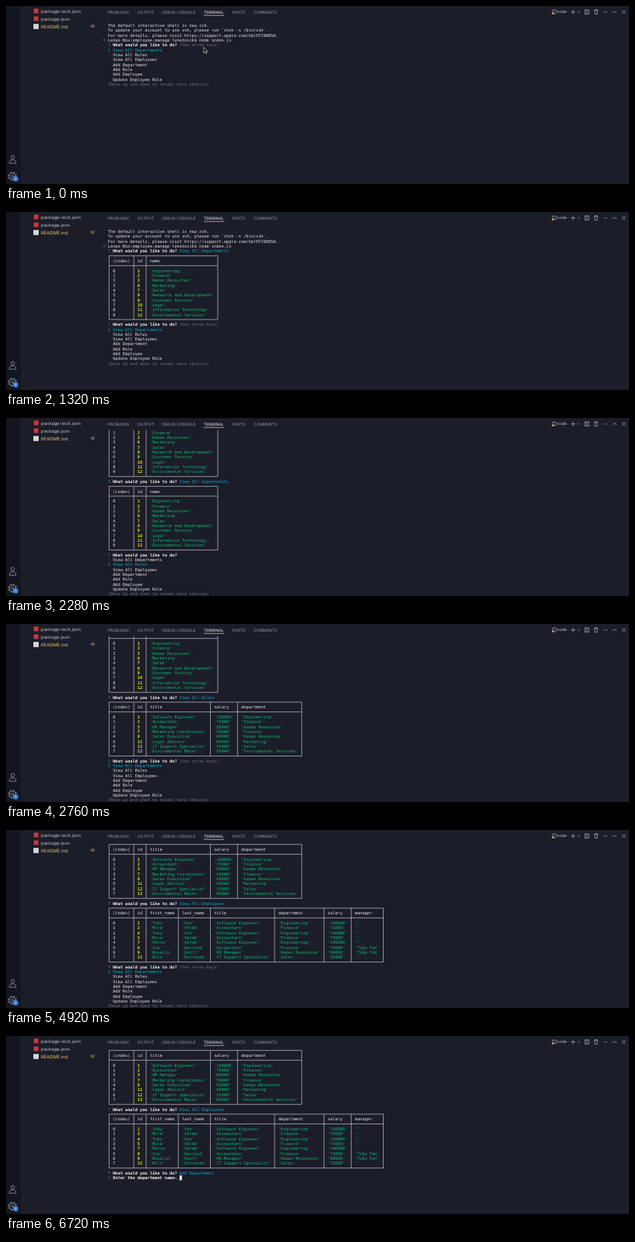
An HTML page for the animation above (8 s loop, 800 by 230 pixels).

```html
<!DOCTYPE html>
<html lang="en">
<head>
<meta charset="utf-8">
<title>Terminal session</title>
<style>
  html, body { margin: 0; width: 100%; height: 100%; overflow: hidden; background: #1b1d29; }
  svg { display: block; width: 800px; height: 230px; }
  text { white-space: pre; text-rendering: geometricPrecision; }
  .ui { font-family: Inter, "Open Sans", sans-serif; }
  .tabs { font-size: 5.05px; fill: #9a9ca6; }
  .files { font-size: 5.85px; fill: #c3c5cd; }
  .icons { fill: none; stroke: #c0c2ca; stroke-width: .65; }
  #term { font: 5.27px "DejaVu Sans Mono", "Liberation Mono", monospace; }
  .white { fill: #e6e6e8; }
  .bold { fill: #f2f2f2; font-weight: bold; }
  .dim { fill: #6c6e76; }
  .green { fill: #0dbc79; }
  .cyan { fill: #11a8cd; }
  .yellow { fill: #e5e510; font-weight: bold; }
  .box { fill: none; stroke: #c4c5ca; stroke-width: .7; }
</style>
</head>
<body>
<svg viewBox="0 0 800 230">
  <defs><clipPath id="pane"><rect x="120" y="15.6" width="677" height="215"/></clipPath></defs>
  <rect width="800" height="230" fill="#1b1d29"/>
  <rect width="19" height="230" fill="#14161f"/>

  <g class="ui files">
    <rect x="35.7" y="3.4" width="6" height="6" fill="#cb3837"/>
    <rect x="35.7" y="13.4" width="6" height="6" fill="#cb3837"/>
    <rect x="35.2" y="23.2" width="6.8" height="6.6" fill="#d9d6d6"/>
    <text x="45" y="8.6">package-lock.json</text>
    <text x="45" y="18.6">package.json</text>
    <g fill="#e3c06f">
      <text x="45" y="28.6">README.md</text>
      <text x="109" y="28.4" font-size="5.3">M</text>
    </g>
  </g>

  <g fill="none" stroke="#868995" stroke-width=".9">
    <circle cx="8.6" cy="195.4" r="2.3"/>
    <path d="M4.4 203.2v-1.2q0-3.2 4.2-3.2t4.2 3.2v1.2z"/>
    <circle cx="8.4" cy="220" r="4.1"/>
    <circle cx="8.4" cy="220" r="5" stroke-dasharray="1.96" stroke-width="1.3"/>
    <circle cx="8.4" cy="220" r="1.5"/>
  </g>
  <circle cx="12.3" cy="223.3" r="3.5" fill="#3c7fd0"/>
  <text class="ui" x="12.3" y="224.9" font-size="4.4" fill="#fff" text-anchor="middle">1</text>

  <g class="ui tabs">
    <text x="130.6" y="9.5">PROBLEMS</text>
    <text x="168.8" y="9.5">OUTPUT</text>
    <text x="200.3" y="9.5">DEBUG CONSOLE</text>
    <text x="254" y="9.5" fill="#f0f0f2">TERMINAL</text>
    <text x="290.4" y="9.5">PORTS</text>
    <text x="318" y="9.5">COMMENTS</text>
    <text x="707.6" y="9.4" fill="#c6c8d0" font-size="5.2">node</text>
  </g>
  <rect x="254" y="11.8" width="26" height=".7" fill="#d8d9de"/>

  <g class="icons">
    <path d="M702 5.2h4v4.6h-4z"/>
    <path d="M728.2 4.7v6M725.2 7.7h6M733.9 7l1.4 1.4 1.4-1.4"/>
    <path d="M743.3 5h5.2v5.4h-5.2zM745.9 5v5.4"/>
    <path d="M755.3 5.7h5M756 5.7l.3 4.9h3l.3-4.9M757 5.5v-.9h1.6v.9"/>
    <path d="M767 7.8h.9M769 7.8h.9M771 7.8h.9" stroke-width=".9"/>
    <path d="M778.8 9l2.6-2.6L784 9M791.2 5.4l4.4 4.4M795.6 5.4l-4.4 4.4"/>
  </g>
  <circle cx="702.2" cy="9.6" r="1.3" fill="#d9a94a"/>
  <rect x="797.2" y="15.6" width=".5" height="215" fill="#292c39"/>

  <g id="term" clip-path="url(#pane)"></g>
  <path id="pointer" d="M253.9 53.4v7l1.6-1.4 1.1 2.5 1.2-.5-1.1-2.4 2.2-.1z"
        fill="#000" stroke="#fff" stroke-width=".6"/>
</svg>
<script>
const LOOP = 8000, LEFT = 130.8, TOP = 25, CHAR = 3.172, ROW = 6.33, ROWS = 33;
const term = document.getElementById('term');
const pointer = document.getElementById('pointer');

const choices = ['View All Departments', 'View All Roles', 'View All Employees',
  'Add Department', 'Add Role', 'Add Employee', 'Update Employee Role'];

const intro = ['The default interactive shell is now zsh.',
  'To update your account to use zsh, please run `chsh -s /bin/zsh`.',
  'For more details, please visit https://support.apple.com/kb/HT208050.',
  'Lenas-Box:employee.manage lenatovik$ node index.js'];

const parse = (head, body) => ({
  head: ['(index)', ...head.split('|')],
  rows: body.trim().split('\n').map((line, i) => {
    const [id, ...cells] = line.trim().split('|');
    return [String(i), id, ...cells.map(c => `'${c}'`)];
  })
});

const departments = parse('id|name', `
  1|Engineering
  2|Finance
  3|Human Resources
  6|Marketing
  7|Sales
  8|Research and Development
  9|Customer Service
  10|Legal
  11|Information Technology
  12|Enviromental Services`);

const roles = parse('id|title|salary|department', `
  1|Software Engineer|100000|Engineering
  2|Accountant|75000|Finance
  3|HR Manager|80000|Human Resources
  7|Marketing Coordinator|50000|Finance
  8|Sales Executive|60000|Human Resources
  11|Legal Advisor|80000|Marketing
  12|IT Support Specialist|55000|Sales
  13|Enviromental Maint.|80000|Enviromental Services`);

const employees = parse('id|first_name|last_name|title|department|salary|manager', `
  1|Toby|Fen|Software Engineer|Engineering|100000| 
  2|Mira|Velde|Accountant|Finance|75000| 
  4|Toby|Fen|Software Engineer|Engineering|100000| 
  5|Mira|Velde|Accountant|Finance|75000| 
  7|Petra|Velde|Software Engineer|Engineering|100000| 
  8|Ivo|Harlund|Accountant|Finance|75000|Toby Fen
  9|Rosalin|Quill|HR Manager|Human Resources|80000|Toby Fen
  12|Nils|Ostravek|IT Support Specialist|Sales|55000| `.replace(/\| *(?=\n|$)/g, '| ')
  .concat('\n').replace(/\| \n$/, '|\u00a0'));

// Answered questions: chosen item and the table it prints
const answers = [[0, departments], [0, departments], [1, roles], [2, employees]];

// [start ms, answers on screen, selected choice | 'busy' | 'form']
const timeline = [
  [0, 0, 0], [600, 1, 'busy'], [660, 1, 0], [1620, 2, 'busy'], [1680, 2, 0],
  [2280, 2, 1], [2760, 3, 0], [3900, 3, 1], [4140, 3, 2], [4500, 4, 0],
  [5460, 4, 1], [5760, 4, 2], [6000, 4, 3], [6300, 4, 'form']
];

const colX = col => LEFT + col * CHAR;
const rowY = row => TOP + row * ROW;

function add(tag, attrs, content = '') {
  const el = document.createElementNS('http://www.w3.org/2000/svg', tag);
  for (const key in attrs) el.setAttribute(key, attrs[key]);
  el.textContent = content;
  term.append(el);
}

function put(row, col, content, style = 'white') {
  add('text', { x: colX(col), y: rowY(row) + 1.9, class: style }, content);
}

function ask(row, message, reply = '', style = 'cyan') {
  put(row, 0, '?', 'green');
  put(row, 2, message, 'bold');
  if (reply) put(row, 3 + message.length, reply, style);
}

function drawTable(row, { head, rows }) {
  const all = [head, ...rows];
  const edges = [0];
  head.forEach((_, c) => {
    const width = Math.max(...all.map(r => r[c].length));
    edges.push(edges[c] + width + 3);
  });
  all.forEach((cells, r) => cells.forEach((cell, c) => {
    const style = r === 0 || c === 0 ? 'white' : c === 1 ? 'yellow' : 'green';
    put(row + 1 + r + (r > 0), edges[c] + 2, cell, style);
  }));
  const bottom = row + rows.length + 3;
  const x = edges.map(e => colX(e + .5));
  const across = [row, row + 2, bottom].map(r => `M${x[0]} ${rowY(r)}H${x.at(-1)}`);
  const down = x.map(v => `M${v} ${rowY(row)}V${rowY(bottom)}`);
  add('path', { class: 'box', d: across.join('') + down.join('') });
}

function drawMenu(row, selected) {
  ask(row, 'What would you like to do?', selected ? '' : '(Use arrow keys)', 'dim');
  choices.forEach((choice, i) => {
    const on = i === selected;
    if (on) put(row + 1 + i, 0, '❯', 'cyan');
    put(row + 1 + i, 2, choice, on ? 'cyan' : 'white');
  });
  put(row + 8, 0, '(Move up and down to reveal more choices)', 'dim');
}

function drawForm(row) {
  ask(row, 'What would you like to do?', choices[3]);
  ask(row + 1, 'Enter the department name:');
  add('rect', { x: colX(29), y: rowY(row + 1) - 3, width: CHAR, height: 6.2, fill: '#e6e6e8' });
}

function render([, count, mode]) {
  term.textContent = '';
  const shown = answers.slice(0, count);
  const used = shown.reduce((n, [, t]) => n + t.rows.length + 5, intro.length);
  const scroll = Math.max(0, used + (mode === 'busy' ? 1 : 9) - ROWS);

  let row = -scroll;
  add('circle', { cx: 126.3, cy: rowY(row + 3), r: 1.3, fill: 'none', stroke: '#6c6e76', 'stroke-width': .6 });
  intro.forEach(line => put(row++, 0, line));
  for (const [choice, table] of shown) {
    ask(row, 'What would you like to do?', choices[choice]);
    drawTable(row + 1, table);
    row += table.rows.length + 5;
  }
  if (mode === 'form') drawForm(row);
  else if (mode !== 'busy') drawMenu(row, mode);
}

let current;
const start = performance.now();
function tick(now) {
  const t = Math.max(0, now - start) % LOOP;
  const step = timeline.findLast(s => s[0] <= t);
  if (step !== current) {
    current = step;
    render(step);
    pointer.style.display = step[0] < 600 ? '' : 'none';
  }
  requestAnimationFrame(tick);
}
tick(start);
</script>
</body>
</html>
```
